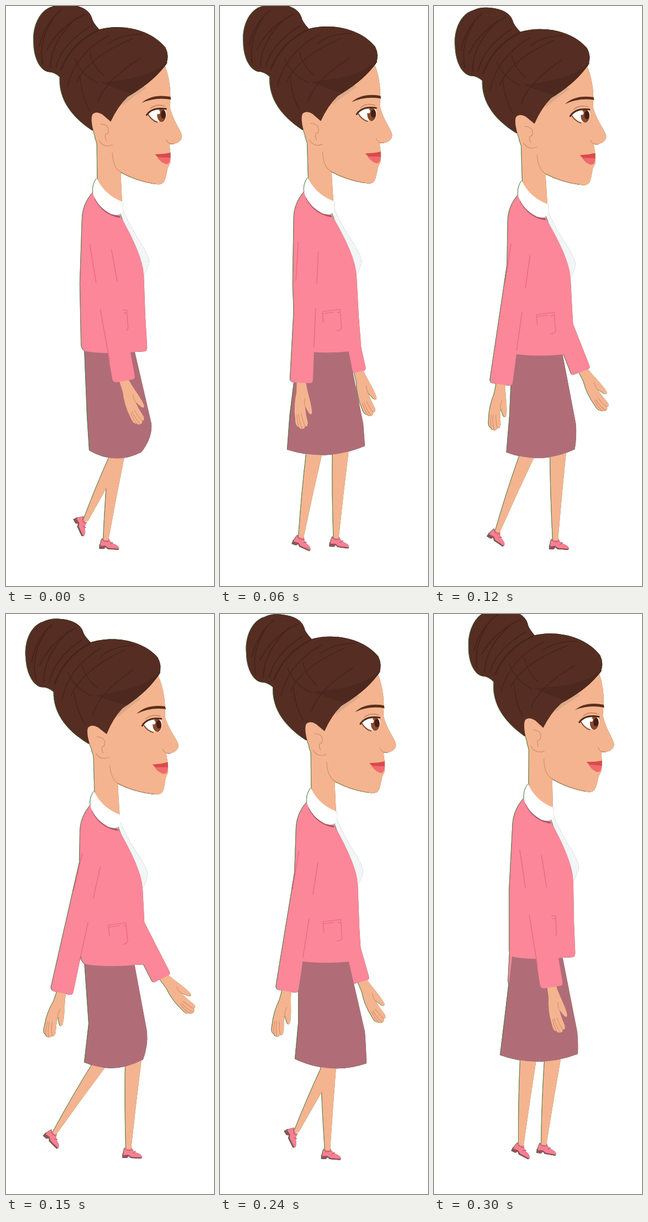
Animation of 376 by 1048 pixels, one loop 0.33 s. Source, as an HTML page with a canvas:

```html
<!DOCTYPE html>
<html lang="en">
<head>
<meta charset="utf-8">
<title>Walking woman</title>
<style>
  html, body { margin: 0; width: 100%; height: 100%; overflow: hidden; background: #fff; }
  canvas {
    display: block;
    filter: drop-shadow(.6px 0 0 rgba(20, 80, 15, .7)) drop-shadow(-.6px 0 0 rgba(20, 80, 15, .7));
  }
</style>
</head>
<body>
<canvas width="376" height="1048"></canvas>
<script>
const ctx = document.querySelector('canvas').getContext('2d');
const STEP = 30, LOOP = 330;
const SKIN = '#f4b48f', CREASE = '#d68f6c', PINK = '#fb8799', FOLD = '#e9687f';
const HAIR = '#552d23', STRAND = '#472419', SKIRT = '#b06d77', LIP = '#d94a4b';

// body: lean, drop, head tilt; arm: sleeve and hand angle; far: wrist x, y, sleeve and hand angle
// skirt: left mid x, left hem x, y, right mid x, right hem x, y; legs: hip x, ankle x, y, foot angle
const forward = { body: [5, 2, 0], arm: [-10.2, -18], far: [185, 655, 0, 0],
  skirt: [147, 151, 803, 263, 245, 806], back: [191, 143, 928, 62], front: [187, 180, 963, 2] };
const upright = { body: [0, 0, 0], arm: [1.6, 0], far: [247, 659, -9, -10],
  skirt: [129, 123, 800, 260, 263, 793], back: [160, 151, 957, 22], front: [203, 202, 957, 7] };
const parting = { body: [-1, 2, -.6], arm: [3.7, 3], far: [254, 661, -16, -16],
  skirt: [124, 121, 803, 258, 261, 797], back: [153, 141, 960, 20], front: [204, 217, 962, 1] };
const stride = { body: [0, 11, -2.7], arm: [12.4, 19], far: [285, 656, -27, -37],
  skirt: [150, 142, 810, 255, 248, 805], back: [161, 87, 936, 42], front: [216, 221, 965, 0] };
const passing = { body: [5, 5, -.8], arm: [8.9, 15], far: [257, 663, -16, -23],
  skirt: [142, 136, 804, 262, 265, 812], back: [190, 137, 934, 60], front: [182, 194, 967, 1] };
const leaning = { body: [11, -2, 1.75], arm: [-9.2, -8], far: [156, 668, 3, 0],
  skirt: [127, 120, 797, 259, 260, 795], back: [156, 157, 958, 25], front: [200, 198, 957, 7] };

const keys = [[0, forward], [30, upright], [90, parting], [150, stride],
  [210, stride], [240, passing], [300, leaning]];

function poseAt(t) {
  const i = keys.findLastIndex(k => k[0] <= t);
  const [t0, a] = keys[i], [t1, b] = keys[i + 1] || [LOOP, a];
  const u = (t - t0) / (t1 - t0);
  const pose = {};
  for (const part in a) pose[part] = a[part].map((v, j) => v + (b[part][j] - v) * u);
  return pose;
}

function fill(color, d) {
  ctx.fillStyle = color;
  ctx.fill(new Path2D(d));
}
function line(color, width, d) {
  ctx.strokeStyle = color;
  ctx.lineWidth = width;
  ctx.stroke(new Path2D(d));
}
function oval(color, x, y, rx, ry) {
  ctx.fillStyle = color;
  ctx.beginPath();
  ctx.ellipse(x, y, rx, ry, 0, 0, 7);
  ctx.fill();
}
function at(x, y, deg, draw) {
  ctx.save();
  ctx.translate(x, y);
  ctx.rotate(deg * Math.PI / 180);
  draw();
  ctx.restore();
}

function hand() {
  fill(SKIN, 'M-8-5L8-5C10 14 20 36 21 53Q20 60 15 54L8 42Q10 58 14 72Q14 81 9 78Q9 84 4 83Q0 84-2 80Q-8 80-9 66Q-13 42-8 18Z');
  line(CREASE, 1.1, 'M8 42Q6 36 8 28M9 78Q4 68 2 56M4 83Q-2 70-3 57M-2 80Q-6 70-6 58');
}

function leg([hip, x, y, foot]) {
  fill(SKIN, `M${hip} 805Q${(hip + x) / 2 - 4} ${(805 + y) / 2} ${x - 4} ${y + 3}H${x + 5}Q${(hip + 29 + x) / 2 + 2} ${(805 + y) / 2} ${hip + 29} 805Z`);
  at(x, y, foot, () => {
    fill('#94505a', 'M-6 5L-10 11V18H-2L1 14L5 18L24 19L25 16Z');
    fill('#f77f92', 'M-6-1L-4 2H4L6-1Q9 7 17 9Q25 12 25 17L6 16L0 12L-9 13Q-9 5-6-1Z');
    line('#a8525f', 1, 'M-6 1Q0 7 7 3M9 9L13 6');
  });
}

function farArm([x, y, sleeve, palm]) {
  at(x, y, palm, hand);
  at(x, y, sleeve, () => {
    fill(PINK, 'M-22-115H14V-4Q14 1 9 1H-17Q-22 1-22-4Z');
  });
}

function skirt([lm, lx, ly, rm, rx, ry], drop) {
  const top = 615 + drop;
  fill(SKIRT, `M142 ${top}H231L${rm} 755Q${rm + 2} 780 ${rx} ${ry}Q${(lx + rx) / 2} ${(ly + ry) / 2 + 26} ${lx} ${ly}L${lm} 740Z`);
}

function torso() {
  fill(SKIN, 'M158 225L161 330L206 360L202 295L210 225Z');
  fill('#f2f6f7', 'M198 360L206 362Q215 386 235 418Q256 448 256 461Q254 474 246 486Z');
  fill(PINK, 'M155 332Q134 354 134 384L132 500L136 610Q137 620 145 622Q185 628 235 623L252 622Q256 620 255 612L251 560L247 484Q245 448 201 374Q168 362 155 332Z');
  line(FOLD, 1.2, 'M187 570L185 551L217 547L220 581Q218 585 211 586M186 555L206 552M212 553L217 552');
  line('#a65662', 3, 'M157 346Q172 374 201 379');
  fill('#fff', 'M159 309Q150 322 153 338Q162 362 186 374Q206 380 207 364V352Q174 340 159 309Z');
}

function nearArm(angle, palm) {
  const length = 280, a = angle * Math.PI / 180;
  at(-length * Math.sin(a), length * Math.cos(a), palm, hand);
  at(0, 0, angle, () => {
    fill(PINK, 'M-18 12L-20 274Q-19 280-12 280H16Q21 280 21 273L19 12Q0-8-18 12Z');
    line(FOLD, 1.3, 'M-17 26L-18 96M20 42L20 100');
    const edge = angle < 0 ? -19 : 20;
    line(FOLD, 1.3, `M${edge} 145V${angle < 0 ? 240 : 215}`);
  });
}

function eye() {
  fill('#fff', 'M250 190Q262 180 281 183L284 190Q284 202 279 206Q261 208 250 190Z');
  oval('#8a4a2c', 275, 194.5, 8, 12);
  oval('#461f16', 278, 193, 4.5, 7.5);
  oval('#fff', 269.5, 189, 2.8, 3.5);
  line('#502a19', 3, 'M248 194Q258 179 283 183');
  line('#6b3b25', 1.5, 'M250 192Q257 204 267 207');
  line('#b9795a', 1.2, 'M255 182Q266 173 281 178');
  fill('#5b2f1c', 'M239 172Q258 155 291 161L292 166Q264 161 239 172Z');
}

function head() {
  fill(SKIN, 'M155 235V190L200 110L281 104Q291 130 291 160L290 180C297 207 311 222 312 232C312 242 300 248 289 246L291 262V280L286 290Q282 312 279 315Q276 320 267 319Q228 313 200 296Q188 285 186 262L160 250Z');
  line(CREASE, 1.2, 'M186 262Q187 289 201 297Q230 313 262 318M283 238Q286 247 297 246');
  eye();
  fill(LIP, 'M263 265L280 264L291 262V272L270 272Z');
  fill('#f16a6e', 'M267 270L291 271Q290 283 284 283Q274 281 267 270Z');

  fill('#dba988', 'M204 177Q225 160 248 145L240 139L205 165Z');
  fill(HAIR, 'M163 40Q150 26 149 18Q142-2 108-6Q90-8 78-2C55 4 42 34 44 62C44 90 55 112 70 116Q82 116 92 126L130 90Z');
  line(STRAND, 2, 'M60 102Q52 60 80 18M74 108Q75 60 122 18M68 76Q90 34 136 12M84 108Q94 66 146 34M54 70Q62 30 94 4');
  fill(HAIR, 'M160 40C200 28 255 38 282 72Q290 88 283 103C258 134 230 152 214 161Q196 178 183 206L150 222C110 195 84 160 93 112Q105 68 160 40Z');
  fill('#4c281e', 'M285 98C255 125 215 130 165 135Q200 150 222 155Q262 133 285 100Z');
  line(STRAND, 3, 'M160 41Q112 64 93 112');
  line(STRAND, 1.5, 'M105 142Q118 84 180 50M122 134Q142 90 222 56M118 92Q130 122 160 136M145 80Q150 105 170 122M160 170Q172 132 236 92M145 186Q130 160 128 126M178 66Q200 48 240 48');

  fill(SKIN, 'M160 242C150 226 146 200 150 193Q156 186 168 193L183 206L188 240L176 252Z');
  line(CREASE, 1.3, 'M165 210Q183 212 178 227Q170 228 175 240M162 240Q170 254 186 248');
}

function draw(t) {
  const { body: [lean, drop, tilt], arm, far, skirt: hem, back, front } = poseAt(t);
  ctx.clearRect(0, 0, 376, 1048);
  farArm(far);
  leg(back);
  leg(front);
  skirt(hem, drop);
  ctx.save();
  ctx.transform(1, 0, -lean / 310, 1, 2 * lean, drop);
  torso();
  ctx.restore();
  at(160 + lean * .71, 400 + drop, 0, () => nearArm(...arm));
  at(160 + lean * 1.25, 231 + drop, tilt, () => {
    ctx.translate(-160, -230);
    head();
  });
}

ctx.lineCap = ctx.lineJoin = 'round';
const start = performance.now();
function tick() {
  const t = (performance.now() - start) % LOOP;
  draw(Math.floor(t / STEP) * STEP);
  requestAnimationFrame(tick);
}
tick();
</script>
</body>
</html>
```
